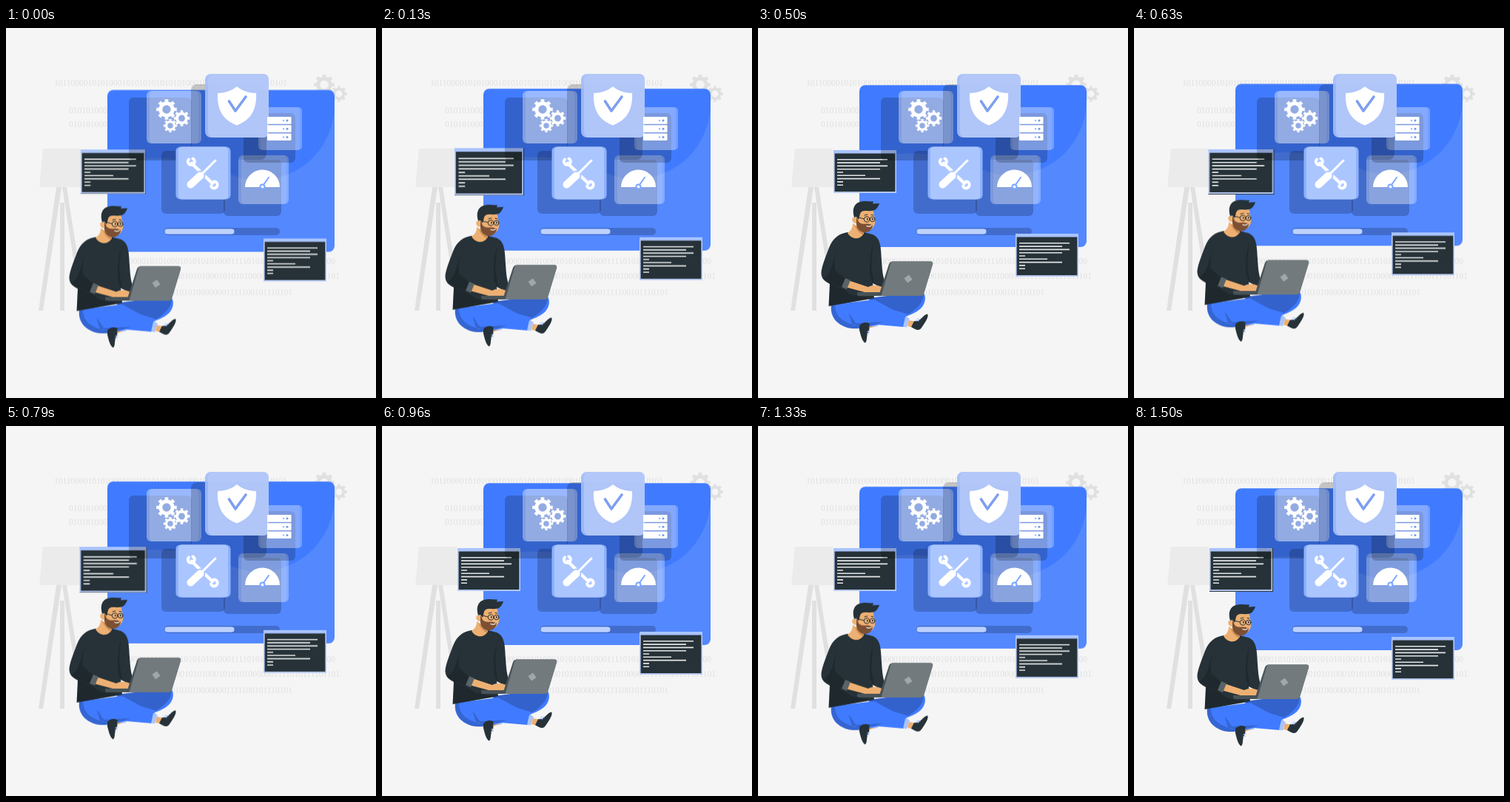
Recreate the animation shown at these times as an HTML page without scripts. Size 500 px wide and 500 px high, loop 1540 ms.

```html
<!DOCTYPE html>
<html lang="en">
<head>
<meta charset="utf-8">
<title>Developer at work</title>
<style>
  html, body { margin: 0; width: 100%; height: 100%; overflow: hidden; background: #f5f5f5; }
  svg { display: block; width: 100vw; height: 100vh; }
  .float { animation: float 1540ms linear -40ms infinite; }
  .beat { animation: beat 1540ms linear -40ms infinite; transform-origin: 144.5px 193.8px; }
  @keyframes float { 50% { transform: translateY(-10px); } }
  @keyframes beat {
    0%, 30%, 40%, 60%, 100% { transform: scale(1); }
    10%, 50% { transform: scale(1.1); }
  }
  .binary { font: 11.5px "Liberation Serif", serif; fill: #e0e0e0; }
  .end { text-anchor: end; }
  .shadow { fill: #000; fill-opacity: .2; }
  .card { fill: #fff; }
  .line { fill: none; stroke-linecap: round; stroke-linejoin: round; }
  .ink { fill: #263238; }
  .skin { fill: #eeb072; }
  .blue { fill: #407bff; }
  .pale { fill: #a9c4ff; }
</style>
</head>
<body>
<svg viewBox="0 0 500 500">
  <defs>
    <g id="gear" fill="none" stroke="currentColor">
      <circle r="8.2" stroke-width="5"/>
      <circle r="11.8" stroke-width="4" pathLength="16" stroke-dasharray="1 1" stroke-dashoffset=".5"/>
    </g>
    <g id="window">
      <rect width="85" height="58" fill="#bccdf6"/>
      <rect width="85" height="4.5" fill="#a9c4ff"/>
      <rect class="ink" x="1.6" y="4.5" width="81.8" height="51.6"/>
      <path d="M5 12.8h68M5 17.1h58M5 21.4h68M5 25.7h58M5 30h8M5 34.3h38M5 38.6h58M5 42.9h8M5 47.2h8" stroke="#e3e5e6" stroke-width="1.6"/>
    </g>
    <g id="unit">
      <rect width="32.5" height="9.7" rx="1" fill="#fff"/>
      <circle cx="22" cy="5" r="1" fill="#6d9bff"/>
      <circle cx="27" cy="5" r="1.5" fill="#6d9bff"/>
    </g>
    <clipPath id="screen"><rect x="137" y="84.2" width="307" height="218.8" rx="8"/></clipPath>
  </defs>

  <!-- backdrop -->
  <g class="binary">
    <text x="65" y="78">1011000010101000101010101010101000101010100010101110101</text>
    <text x="85" y="115">0101010001</text>
    <text x="85" y="134">0101010001</text>
    <g class="end">
      <text x="445" y="319">10000101010001010101010001111010101111010101000100</text>
      <text x="451" y="339">1010001010100010101010000001111010111101101</text>
      <text x="387" y="361">01010100000001111100101110101</text>
    </g>
  </g>
  <path d="M50 163h51l5 52H45z" fill="#ebebeb"/>
  <path d="M68 215h7L50 382h-6zM76 215h6l26 167h-6zM73 236h6v146h-6z" fill="#e0e0e0"/>
  <g color="#e0e0e0">
    <use href="#gear" transform="translate(430 76.5)"/>
    <use href="#gear" transform="translate(450 89) scale(.78)"/>
  </g>

  <g class="float" clip-path="url(#screen)">
    <path class="blue" d="M137 84h307v220H137z"/>
    <path d="M137 190C175 172 225 174 262 184S320 210 352 206C405 199 440 160 444 110V304H137z" fill="#5388ff"/>
  </g>

  <use class="beat" href="#window" x="102" y="165"/>

  <!-- feature cards -->
  <rect class="shadow" x="166" y="94" width="85" height="85" rx="6"/>
  <rect class="shadow" x="210" y="166" width="86" height="85" rx="6"/>
  <rect class="shadow" x="294" y="178" width="78" height="76" rx="6"/>
  <g class="card">
    <rect x="190" y="85" width="74" height="71" rx="6" opacity=".38"/>
    <rect x="194" y="85" width="66" height="71" rx="5" opacity=".14"/>
    <rect x="314" y="172" width="68" height="66" rx="6" opacity=".3"/>
    <rect x="318" y="172" width="61" height="66" rx="5" opacity=".1"/>
  </g>
  <rect class="shadow" x="321" y="115" width="70" height="67" rx="6"/>
  <g class="card">
    <rect x="341" y="107" width="59" height="58" rx="5" opacity=".28"/>
    <rect x="344" y="107" width="53" height="58" rx="4" opacity=".1"/>
  </g>
  <rect class="shadow" x="250" y="76" width="102" height="102" rx="8"/>
  <rect x="229.5" y="160.5" width="74" height="71" rx="6" fill="#8fb1fb"/>
  <rect x="233" y="160.5" width="67" height="71" rx="5" fill="#abc6ff"/>
  <rect x="269" y="62" width="86" height="86" rx="8" fill="#a2bdfb" fill-opacity=".93"/>
  <rect x="273" y="62" width="82" height="86" rx="7" fill="#b5c8f8" fill-opacity=".85"/>

  <g color="#fff">
    <use href="#gear" transform="translate(217 110)"/>
    <use href="#gear" transform="translate(237.5 122) scale(.78)"/>
    <use href="#gear" transform="translate(222 132) scale(.66)"/>
  </g>
  <path d="M312 79C305 85 295 88 286 88C285 109 292 124 312 131.500C332 124 339 109 338 88C329 88 319 85 312 79z" fill="#fff"/>
  <path class="line" d="M301.500 99l8.500 13 14-19" stroke="#7e9ff0" stroke-width="3.600"/>
  <use href="#unit" x="353" y="120"/>
  <use href="#unit" x="353" y="131.200"/>
  <use href="#unit" x="353" y="142.400"/>
  <path d="M323 215a23.500 23.500 0 0 1 47 0z" fill="#fff"/>
  <path class="line" d="M346.500 214l8.500-12" stroke="#7ea6ff" stroke-width="2"/>
  <circle cx="346.500" cy="214.500" r="3" fill="#fff" stroke="#7ea6ff" stroke-width="2"/>
  <g class="line" stroke="#fff">
    <path d="M251 183l28 27" stroke-width="4.500"/>
    <path d="M247 177.500a4.500 4.500 0 1 0 5.500-1M277 213.500a4.500 4.500 0 1 0 4-6" stroke-width="4"/>
    <path d="M284 178.500l-21 21" stroke="#abc6ff" stroke-width="6"/>
    <path d="M263 199l-13 12.500" stroke="#abc6ff" stroke-width="13"/>
    <path d="M283 179l-20 20" stroke-width="3"/>
    <path d="M262.500 199.500l-13 12" stroke-width="10"/>
  </g>
  <rect class="shadow" x="214" y="270" width="156" height="10" rx="5"/>
  <rect x="214" y="271" width="95" height="8" rx="4" fill="#bdd1ff" stroke="#3c6cd0" stroke-width=".8"/>

  <g class="float">
    <use href="#window" x="348" y="285"/>

    <!-- legs and shoes -->
    <path class="blue" d="M150 372L222 363C228 368 227 379 220 386C208 397 180 403 150 412z"/>
    <path d="M150 372L222 363C227 372 219 384 203 394L160 381z" fill="#000" opacity=".2"/>
    <path class="skin" d="M149 404l9 2 4 3-12 4z"/>
    <path class="pale" d="M155 407l7-1 0 4-6 1z"/>
    <path class="blue" d="M99 381C97 396 105 407 121 412C133 415 150 411 162 408L197 411L203 399L157 374z"/>
    <path d="M99 382C98 397 107 408 121 412C130 415 145 413 154 410C121 411 104 400 104 381zM122 393C127 395 129 404 133 406L169 404L157 408L130 409C124 406 126 398 122 393z" fill="#000" opacity=".18"/>
    <path class="pale" d="M199 397.500l6 2.500-4 11.500-5-.8z"/>
    <path class="skin" d="M204 402l8 1.500-3 8-7-1.500z"/>
    <path class="ink" d="M207 411L211 403C219 405 222 395 229 393.500C231 396 228 402 221 412C218 417 213 415 207 411zM137 409C141 404 148 404 151 407C149 411 152 413 149 418C146 423 148 430 145 432.500C141 431 139 423 137 415z"/>
    <path class="line" d="M213 402l4 1M215 400l4 1M148 417l3-1M147.500 420l3-1" stroke="#a9c4ff" stroke-width="1.200"/>

    <!-- torso -->
    <path class="ink" d="M121 283C109 285 101 291 96 304C91 317 85 332 85.500 339C86 347 92 350 97 353L95.500 383L157 372L155 352L167 358L172 350C169 344 168 337 167 321C166 303 166 291 155 286L143 283z"/>
    <path d="M107 306C104 317 102 327 105 335L119 347L114 358L97 352L96 382L157 373L127 368L115 360C102 354 92 350 88 345C100 340 101 321 107 306zM155 298C151 315 150 333 152 344L157 355L153 328z" fill="#000" opacity=".2"/>

    <!-- head -->
    <path class="skin" d="M128 271C128 278 125 281 121 284C127 293 137 294 143 285L142 279z"/>
    <path d="M131 274L143 280L142 287C137 284 133 280 131 274z" fill="#b97843" opacity=".6"/>
    <path class="skin" d="M132 259C139 252 153 250 156 255C157 262 159 267 158 271C156 279 150 282 143 281C136 279 133 274 133 271C126 271 125 261 132 263z"/>
    <path d="M133 262L136 269C141 274 146 270 151 272L155 274C154 280 149 284 143 283C137 282 132 277 133 268z" fill="#7d5034"/>
    <path class="line" d="M147 274.500q3 1.500 6-.3" stroke="#fff" stroke-width="1.300"/>
    <path class="ink" d="M130 263C127 254 129 244 138 242C144 240 150 242 156 241.500L155 244.500L164 244C162 250 159 254 153 254C146 255 141 252 138 258L136 266L133 262z"/>
    <g class="line" stroke="#263238" stroke-width="1">
      <circle cx="147" cy="265.500" r="3.700"/>
      <circle cx="154.700" cy="265.500" r="3.300"/>
      <path d="M136 263l7 2M144 260l4-1M153 259.500l3 .5"/>
    </g>
    <path class="ink" d="M147 264h1.500v2.500H147zM154 264h1.500v2.500H154z"/>

    <!-- arms and laptop -->
    <path class="skin" d="M122 348L149 357C156 353 165 355 169 358L165 364L144 364L118 357z"/>
    <path d="M118 345l7 3-5 12-7-3z" fill="#596468"/>
    <path d="M134 364h32v5h-30q-2 0-2-2z" fill="#485358"/>
    <path d="M181 322.500h52q4 0 3 4L224 366q-1 3-4 3H165q-2 0-1-3L177 326q1-3 4-3.500z" fill="#485358"/>
    <path d="M182 322.500h51q4 0 3 4L224 366q-1 3-4 3H166.500L179 326q1-3 3-3.500z" fill="#727a7e"/>
    <rect x="199" y="342" width="8" height="8" fill="#a0a6a9" transform="rotate(-35 203 346)"/>
  </g>
</svg>
</body>
</html>
```
